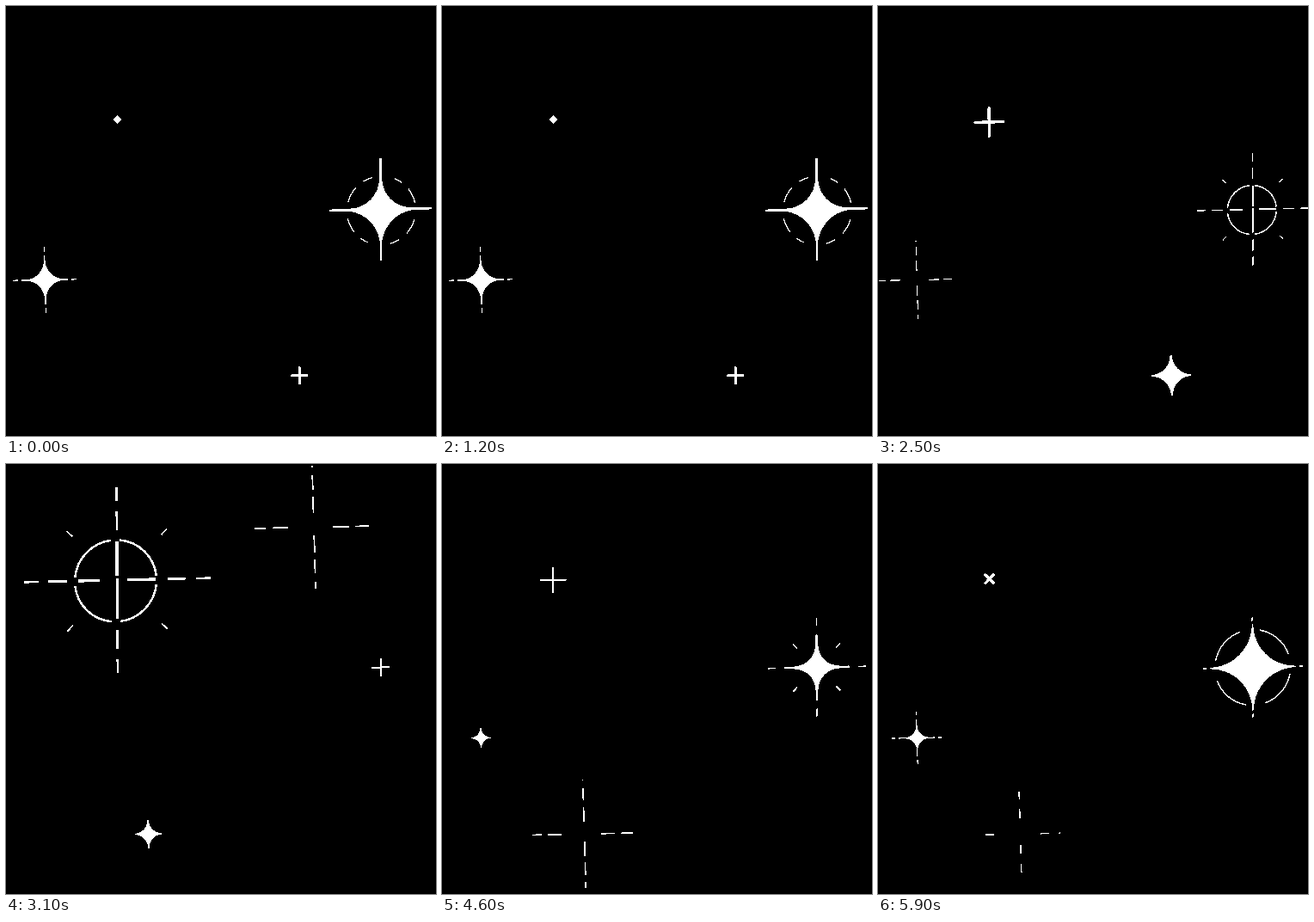
Recreate the animation shown at these times as an HTML page. Size 500x500 px, loop 6.01 s.

```html
<!DOCTYPE html>
<html lang="en">
<head>
<meta charset="utf-8">
<title>Twinkling stars</title>
<style>
  html, body { margin: 0; width: 100%; height: 100%; overflow: hidden; background: #000; }
  svg { display: block; width: 100vw; height: 100vh; }
  path, circle { fill: none; stroke: #fff; shape-rendering: crispEdges; }
  .body { fill: #fff; stroke: none; }
  .pose { visibility: hidden; }
  .pose.on { visibility: visible; }
</style>
</head>
<body>
<svg id="sky" viewBox="0 0 500 500"></svg>
<script>
const STEP = 100, LOOP = 6010, STEPS = 60, CYCLE = 12;

const path = (d, width, extra = '') => `<path d="${d}" stroke-width="${width}" ${extra}/>`;

// Four concave sides; tip is half the tip width, flat opens up the two lower sides
const star = (r, tip, flat = 1) => {
  const arc = k => `A${(r - tip) * k} ${(r - tip) * k} 0 0 0 `;
  return `<path class="body" d="M${tip} ${-r}${arc(1)}${r} ${-tip}V${tip}${arc(flat)}${tip} ${r}` +
    `H${-tip}${arc(flat)}${-r} ${tip}V${-tip}${arc(1)}${-tip} ${-r}Z"/>`;
};

const plus = (r, width) => path(`M${-r} 0H${r}M0 ${-r}V${r}`, width, 'stroke-linecap="round"');

// Four dashed arms; lean makes the right, lower, left and upper arm start unevenly
const LEAN = { right: 4, down: -4, left: 9, up: 0 };
const arms = (from, to, width, dash = 'none', lean = 0) => {
  const at = side => from + lean * LEAN[side];
  return path(`M${at('right')} 0H${to}M0 ${at('down')}V${to}` +
    `M${-at('left')} 0H${-to}M0 ${-at('up')}V${-to}`, width, `stroke-dasharray="${dash}"`);
};

// Dashes and start are in degrees
const ring = (r, width, dash, start, x = 0, y = 0) =>
  `<circle cx="${x}" cy="${y}" r="${r}" pathLength="360" stroke-width="${width}" ` +
  `stroke-dasharray="${dash}" stroke-dashoffset="${-start}"/>`;

const slash = (a, b) => `M${a} ${a}L${b} ${b}M${a} ${-a}L${b} ${-b}`;
const ticks = (a, b, width) => path(slash(a, b) + slash(-a, -b), width);

const ringed = [
  '<path class="body" d="M0 -4.8L3 -1.8L0 1.2L-3 -1.8Z"/>',
  plus(9.7, 2),
  star(17, .9) + plus(21, 1.8),
  star(22, 1.3) + plus(36, 2.2),
  star(26, 1.7) + plus(37, 2.4) + arms(48, 57, 1.6) + ticks(22.5, 27.5, 1.5),
  star(50, .8) + arms(54, 58, 2) + ring(44, 1.5, '60 30', 11),
  star(36, 1.6, 1.2) + plus(58.5, 2.5) + ring(40, 1.3, '27 16 16 38 14 15 26 28', 16, .6, 1.3),
  arms(3, 27, 2, 'none', 1) + arms(35, 65, 1.5, '13 7 10') +
    ring(28.5, 1.5, '78 12', 6, -1, .5) + ticks(31, 35, 1.1),
  arms(18, 46, 1.3, '9 11'),
  plus(6, 1.2),
  plus(8.6, 1.4),
  path(slash(-3.5, 3.5), 1.9, 'transform="translate(.2 -.8)"')
];

const plain = [
  plus(4.3, 1.5),
  star(11.5, .5),
  star(14, .6) + arms(14, 29, 1.2, '7 4 4'),
  star(22, .8) + arms(20, 37, 1.3, '7 4 6'),
  arms(10, 44, 1.15, '12 5 10 6', 1),
  arms(13, 34, 1.1, '7 8', 1)
];

// Hand-drawn slant of each kind, as the first four matrix terms
const ringedSlant = '1 -.022 .006 1', plainSlant = '1 -.02 .03 1.04';

const stars = [
  { x: 129.2, y: 135, size: 1.667, start: 0, poses: ringed, slant: ringedSlant },
  { x: 435.8, y: 236.5, size: 1, start: 6, poses: ringed, slant: ringedSlant },
  { x: 45.3, y: 318.5, size: 1, start: 9, poses: plain, slant: plainSlant },
  { x: 358, y: 73.5, size: 1.56, start: 3, poses: plain, slant: plainSlant },
  { x: 165.5, y: 430.2, size: 1.38, start: 6, poses: plain, slant: plainSlant },
  { x: 341.3, y: 429.5, size: 2, start: 0, poses: plain, slant: plainSlant }
];

const sky = document.getElementById('sky');
sky.innerHTML = stars.map(s =>
  `<g transform="translate(${s.x} ${s.y}) scale(${s.size}) matrix(${s.slant} 0 0)">` +
  s.poses.map(p => `<g class="pose">${p}</g>`).join('') + '</g>').join('');
const groups = [...sky.children];

let shown = -1;
function draw(now) {
  const step = Math.min(STEPS - 1, Math.floor(now % LOOP / STEP)) % CYCLE;
  if (step === shown) return;
  shown = step;
  stars.forEach((s, i) => {
    const pose = (step - s.start + CYCLE) % CYCLE;
    [...groups[i].children].forEach((g, k) => g.classList.toggle('on', k === pose));
  });
}

const begin = performance.now();
function tick() {
  draw(performance.now() - begin);
  requestAnimationFrame(tick);
}
tick();
</script>
</body>
</html>
```
